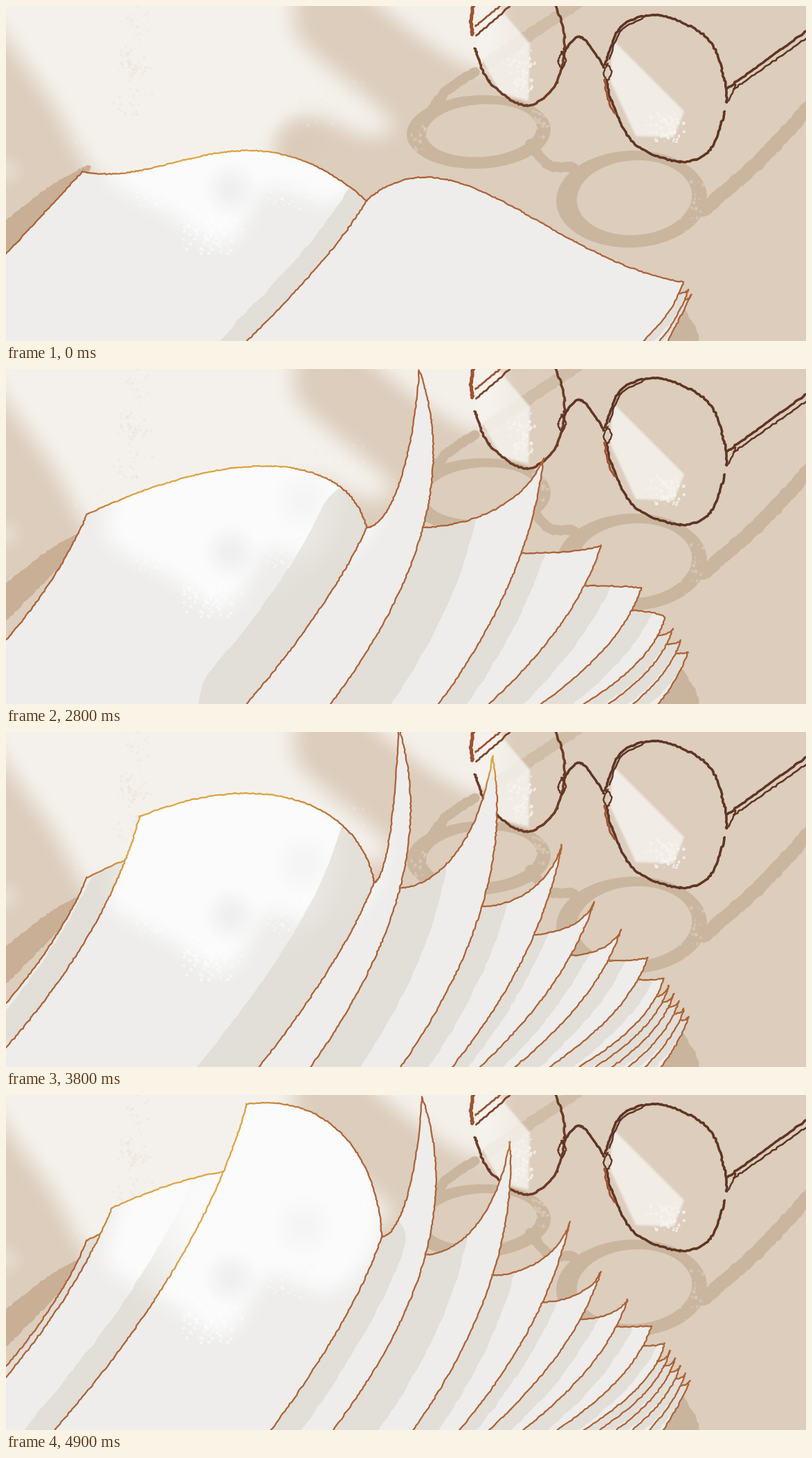
Animation of 1156x484 px, one loop 5000 ms. Source, as an HTML page with a canvas:

```html
<!DOCTYPE html>
<html lang="en">
<head>
<meta charset="utf-8">
<title>Turning pages</title>
<style>
html, body { margin: 0; width: 100%; height: 100%; overflow: hidden; background: #dccdbc; }
canvas { display: block; width: 100%; height: 100%; }
</style>
</head>
<body>
<canvas id="stage" width="1156" height="484"></canvas>
<script>
const W = 1156, H = 484, LOOP = 5000, STEP = 100;
const ctx = document.getElementById('stage').getContext('2d');

let seed = 1;
const random = () => {
  seed = (seed * 1664525 + 1013904223) >>> 0;
  return seed / 4294967296;
};
const clamp = (v, lo = 0, hi = 1) => Math.min(hi, Math.max(lo, v));
const mix = (a, b, k) => a + (b - a) * k;
const mixAll = (a, b, k) => a.map((v, i) => mix(v, b[i], k));
const shift = ([x, y], dx, dy) => [x + dx, y + dy];

// Linear interpolation in rows that start with their position.
function track(rows, at) {
  const i = clamp(rows.findIndex(row => row[0] >= at), 1, rows.length - 1);
  const a = at > rows.at(-1)[0] ? rows.at(-1) : rows[i - 1], b = at > rows.at(-1)[0] ? a : rows[i];
  return mixAll(a, b, a === b ? 0 : clamp((at - a[0]) / (b[0] - a[0]))).slice(1);
}

// Samples a Bezier curve of any degree.
function bezier(...pts) {
  let length = 0;
  for (let i = 1; i < pts.length; i++) length += Math.hypot(pts[i][0] - pts[i - 1][0], pts[i][1] - pts[i - 1][1]);
  const n = Math.max(8, Math.ceil(length / 3.5)), out = [];
  for (let s = 0; s <= n; s++) {
    let p = pts;
    while (p.length > 1) p = p.slice(1).map((q, i) => mixAll(p[i], q, s / n));
    out.push(p[0]);
  }
  return out;
}

// Smooth open curve through points.
function spline(...flat) {
  const n = flat.length / 2, out = [];
  const at = i => {
    const j = clamp(i, 0, n - 1);
    return [flat[2 * j], flat[2 * j + 1]];
  };
  for (let i = 0; i < n - 1; i++) {
    const [a, b, c, d] = [at(i - 1), at(i), at(i + 1), at(i + 2)];
    out.push(...bezier(b, shift(b, (c[0] - a[0]) / 6, (c[1] - a[1]) / 6),
      shift(c, (b[0] - d[0]) / 6, (b[1] - d[1]) / 6), c));
  }
  return out;
}

function trace(g, pts, rough = 0) {
  g.beginPath();
  for (const [x, y] of pts) g.lineTo(x + (random() - 0.5) * rough, y + (random() - 0.5) * rough);
}

function pencil(g, pts, color, width = 2.3, rough = 1.5, cap = 'round') {
  trace(g, pts, rough);
  g.strokeStyle = color;
  g.lineWidth = width;
  g.lineJoin = 'round';
  g.lineCap = cap;
  g.stroke();
}

function fillShape(g, pts, color, blur = 0, rough = 0) {
  g.filter = blur ? `blur(${blur}px)` : 'none';
  trace(g, pts, rough);
  g.fillStyle = color;
  g.fill();
  g.filter = 'none';
}

function speckle(g, x, y, rx, ry, count, color) {
  g.fillStyle = color;
  for (let i = 0; i < count; i++) {
    const dx = random() + random() - 1, dy = random() + random() - 1;
    g.beginPath();
    g.arc(x + dx * rx, y + dy * ry, 0.5 + random() * 2.2, 0, 7);
    g.fill();
  }
}

function glow(g, x, y, r0, r1, rgb, alpha = 1) {
  const grad = g.createRadialGradient(x, y, r0, x, y, r1);
  grad.addColorStop(0, `rgba(${rgb},${alpha})`);
  grad.addColorStop(1, `rgba(${rgb},0)`);
  g.fillStyle = grad;
  g.fillRect(0, 0, W, H);
}

function layer(paint) {
  const c = document.createElement('canvas');
  c.width = W;
  c.height = H;
  paint(c.getContext('2d'));
  return c;
}
const pattern = paint => ctx.createPattern(layer(paint), 'no-repeat');

function paintLight(g) {
  fillShape(g, spline(-40, -40, 375, -40, 425, 50, 555, 165, 520, 188, 445, 160, 390, 195,
    370, 290, 160, 270, 60, 130, -20, 20), '#f4f1ec', 15);
  fillShape(g, spline(490, -40, 680, -40, 715, 40, 690, 92, 610, 55, 490, -40), '#f3efe9', 13);
  glow(g, 425, 195, 5, 45, '217,201,184', 0.6);
  glow(g, 0, 238, 0, 30, '244,241,236', 0.4);
  speckle(g, 185, 80, 30, 100, 110, 'rgba(235,216,200,.28)');
  speckle(g, 430, 135, 100, 45, 160, 'rgba(244,236,230,.35)');
  speckle(g, 135, 190, 40, 50, 110, 'rgba(244,238,232,.35)');
}

function paintShadows(g) {
  const tone = '#cab69f', worn = 'rgba(220,205,188,.6)';
  const ring = (x, y, rx, ry, thick) => {
    g.beginPath();
    g.ellipse(x, y, rx, ry, -0.04, 0, 7);
    g.closePath();
    g.ellipse(x + 4, y - 2, rx - thick * 1.6, ry - thick, -0.07, 0, 7);
    g.fillStyle = tone;
    g.fill('evenodd');
  };
  const band = (width, color, ...pts) => pencil(g, spline(...pts), color, width, 2.5);
  ring(683, 182, 104, 53, 15);
  ring(904, 279, 109, 70, 16);
  band(14, tone, 757, 200, 785, 230, 822, 233);
  band(14, tone, 616, 148, 640, 120, 677, 96);
  band(17, 'rgba(196,174,148,.5)', 697, 82, 826, -5);
  band(20, tone, 1008, 295, 1090, 222, 1166, 140);
  speckle(g, 600, 195, 20, 30, 35, worn);
  speckle(g, 770, 165, 18, 35, 35, worn);
  speckle(g, 990, 290, 25, 45, 45, worn);
  fillShape(g, spline(-10, 318, 70, 256, 120, 238, -10, 375), '#c8af95', 0, 2);
  fillShape(g, spline(975, 430, 998, 468, 996, 490, 940, 490), '#c9b59e', 0, 2);
}

function paintGlasses(g) {
  const shine = 'rgba(246,243,238,.82)', dark = '#5f3524', red = '#9c5230';
  fillShape(g, [[679, 62], [685, 0], [710, 0], [757, 54], [755, 137], [715, 126]], shine, 1.5);
  fillShape(g, [[873, 108], [876, 48], [980, 152], [965, 190], [910, 188]], shine, 1.5);
  speckle(g, 745, 95, 24, 45, 70, shine);
  speckle(g, 955, 175, 32, 24, 90, shine);

  const line = (color, width, ...pts) => pencil(g, spline(...pts), color, width, 1.8);
  const pad = (x, y) => line(dark, 2.3, x, y - 12, x - 5, y + 1, x, y + 12, x + 6, y, x, y - 12);
  line('#6d3b25', 3.6, 678, 61, 698, 109, 752, 144, 796, 110, 807, 45, 791, -8);
  line(red, 5, 676, -5, 672, 20, 674, 41);
  line(red, 2.8, 678, 30, 716, -2);
  line('#7e4228', 2.8, 680, 42, 732, -3);
  line(dark, 3.6, 805, 68, 831, 45, 864, 88);
  pad(803, 78);
  pad(869, 95);
  line(dark, 3.6, 866, 84, 890, 29, 945, 14, 1014, 47, 1039, 110, 1041, 140);
  line(dark, 2.6, 872, 76, 888, 36, 920, 18);
  line(dark, 3.6, 1039, 152, 1018, 207, 974, 225, 908, 199, 875, 137, 868, 107);
  line(red, 3, 865, 106, 870, 135, 880, 156);
  line(dark, 3.6, 1042, 119, 1164, 31);
  line(dark, 2.6, 1052, 120, 1164, 41);
  line(dark, 2.4, 1042, 119, 1054, 114, 1043, 138);
}

const backdrop = layer(g => {
  g.fillStyle = '#dccdbc';
  g.fillRect(0, 0, W, H);
  paintLight(g);
  paintShadows(g);
  paintGlasses(g);
});

const paper = pattern(g => {
  g.fillStyle = '#eeedeb';
  g.fillRect(0, 0, W, H);
  fillShape(g, spline(150, 200, 220, 50, 400, 0, 520, 60, 540, 200, 470, 285, 380, 262, 320, 345,
    235, 300, 150, 250, 150, 200), '#fbfbfb', 14);
  speckle(g, 295, 320, 50, 45, 170, 'rgba(253,253,253,.55)');
  speckle(g, 425, 265, 60, 32, 130, 'rgba(250,250,250,.5)');
  speckle(g, 215, 265, 40, 32, 100, 'rgba(251,251,251,.5)');
  glow(g, 325, 265, 8, 42, '238,238,238', 0.9);
  glow(g, 430, 190, 8, 48, '242,242,244', 0.7);
});

const ink = pattern(g => {
  g.fillStyle = '#ad6236';
  g.fillRect(0, 0, W, H);
  glow(g, 285, 125, 115, 205, '221,164,67');
  glow(g, 695, 25, 25, 75, '221,164,67');
});

const shade = ctx.createRadialGradient(310, 170, 50, 310, 170, 190);
shade.addColorStop(0, 'rgba(226,223,217,.05)');
shade.addColorStop(1, 'rgba(225,221,214,.92)');

// Path of one turning page: place, tip x, tip y, foot x.
// Negative places lie on the right, 0 is nearly upright, 3 rests on the left.
const flip = [
  [-13, 994, 424, 968], [-11, 987, 411, 947], [-6, 950, 356, 828], [-5, 927, 326, 785],
  [-3, 850, 245, 685], [-2, 803, 163, 645], [-1, 703, 35, 570], [0, 567, -8, 440],
  [0.3, 500, -8, 200], [0.75, 348, 13, 70], [1, 193, 122, -25], [1.3, 206, 87, 3],
  [1.75, 153, 163, -70], [2, 117, 210, -90], [3, 111, 239, -117]];

// Time, place of the first page, distance between pages.
const motion = [
  [1700, -9.9, 1], [1800, -7.7, 1.5], [2400, -1.85, 2.2], [3100, 1, 1],
  [3800, 3, 1], [4200, 4.3, 1], [4900, 6.75, 1]];

// Free edge of a page, most bent when the page is nearly upright.
function freeEdge(place) {
  const [x, y, foot] = track(flip, place);
  const extra = 95 * Math.exp(-((place + 0.3) ** 2));
  const bend = (45 + extra) * clamp((place + 12) / 6) * clamp(3 - place);
  return bezier([x, y], [(x + foot) / 2 + bend, (y + H) / 2 - 0.3 * extra], [foot, H]);
}

// Top edge from hinge to tip: sagging on the right, domed on the left;
// a page that lies flat gets a softer wave.
function topEdge(hinge, tip, landed, flat) {
  const dx = tip[0] - hinge[0], dy = tip[1] - hinge[1], span = Math.abs(dx);
  const raised = landed
    ? [shift(hinge, 15 - 0.1 * span, -105), shift(tip, 0.45 * span + 40, 65 - 0.42 * span)]
    : [shift(hinge, 0.35 * dx, 0), shift(hinge, 0.85 * dx, 0.3 * dy)];
  const lying = landed
    ? [shift(hinge, -0.42 * span, -150), shift(tip, 0.3 * span, 27)]
    : [shift(hinge, 0.28 * dx, -112), [tip[0] - 0.9 * (dx - 247), 370]];
  const [a, b] = raised.map((p, i) => mixAll(p, lying[i], flat));
  return bezier(hinge, a, b, tip);
}

function drawBook(time) {
  const [lead, gap] = track(motion, time);
  const closed = clamp((-0.5 - lead) / 1.35), pull = clamp((lead - 1) / 4);
  const places = [2 + closed];
  for (let v = lead; v > -12; v -= gap) if (v < 2) places.push(v);

  const spineTop = [521 + 22 * pull, mix(229, 281, closed) - 24 * pull], spineFoot = 348 + 35 * pull;
  const fold = bezier([spineFoot, H], [(spineTop[0] + spineFoot) / 2 + 40, (spineTop[1] + H) / 2 - 22], spineTop);
  const edges = places.map(freeEdge);
  const top = edges.findLastIndex(edge => edge[0][0] < 535);
  const settled = clamp((places[top] - 0.75) * 4);

  function drawPage(i) {
    const edge = edges[i], landed = i <= top, besideFold = landed || i === top + 1;
    let inner = fold;
    if (!besideFold) {
      const joint = clamp(0.5 + 0.09 * (places[i] + 2), 0.2, 0.5);
      inner = edges[i - 1].slice(Math.round(joint * (edges[i - 1].length - 1))).reverse();
    }
    const flat = besideFold && (i === 0 || !landed) ? closed : 0;
    const outline = [...topEdge(inner.at(-1), edge[0], landed, flat), ...edge];
    const body = [[inner[0][0], H + 40], ...inner, ...outline, [edge.at(-1)[0], H + 40]];

    let caster = fold, width;
    if (i === top) width = settled * (60 + 80 * clamp((lead + 8) / 6));
    else if (i === top + 1) width = 70 * (1 - settled);
    else {
      caster = edges[landed ? i + 1 : i - 1];
      width = landed ? 70 : (edge.at(-1)[0] - caster.at(-1)[0]) * 0.9;
    }

    fillShape(ctx, body, paper);
    if (width > 0) {
      ctx.save();
      ctx.clip();
      pencil(ctx, caster, shade, width, 3, 'square');
      ctx.restore();
    }
    pencil(ctx, i === top ? [...fold, ...outline] : outline, ink);
  }

  for (let i = places.length - 1; i > top; i--) drawPage(i);
  for (let i = 0; i <= top; i++) drawPage(i);
}

let shown = -1;
function frame(now) {
  const time = Math.floor((now - start) % LOOP / STEP) * STEP;
  const step = Math.max(motion[0][0], time);
  if (step !== shown) {
    shown = step;
    seed = step;
    ctx.drawImage(backdrop, 0, 0);
    drawBook(step);
  }
  requestAnimationFrame(frame);
}
const start = performance.now();
frame(start);
</script>
</body>
</html>
```
